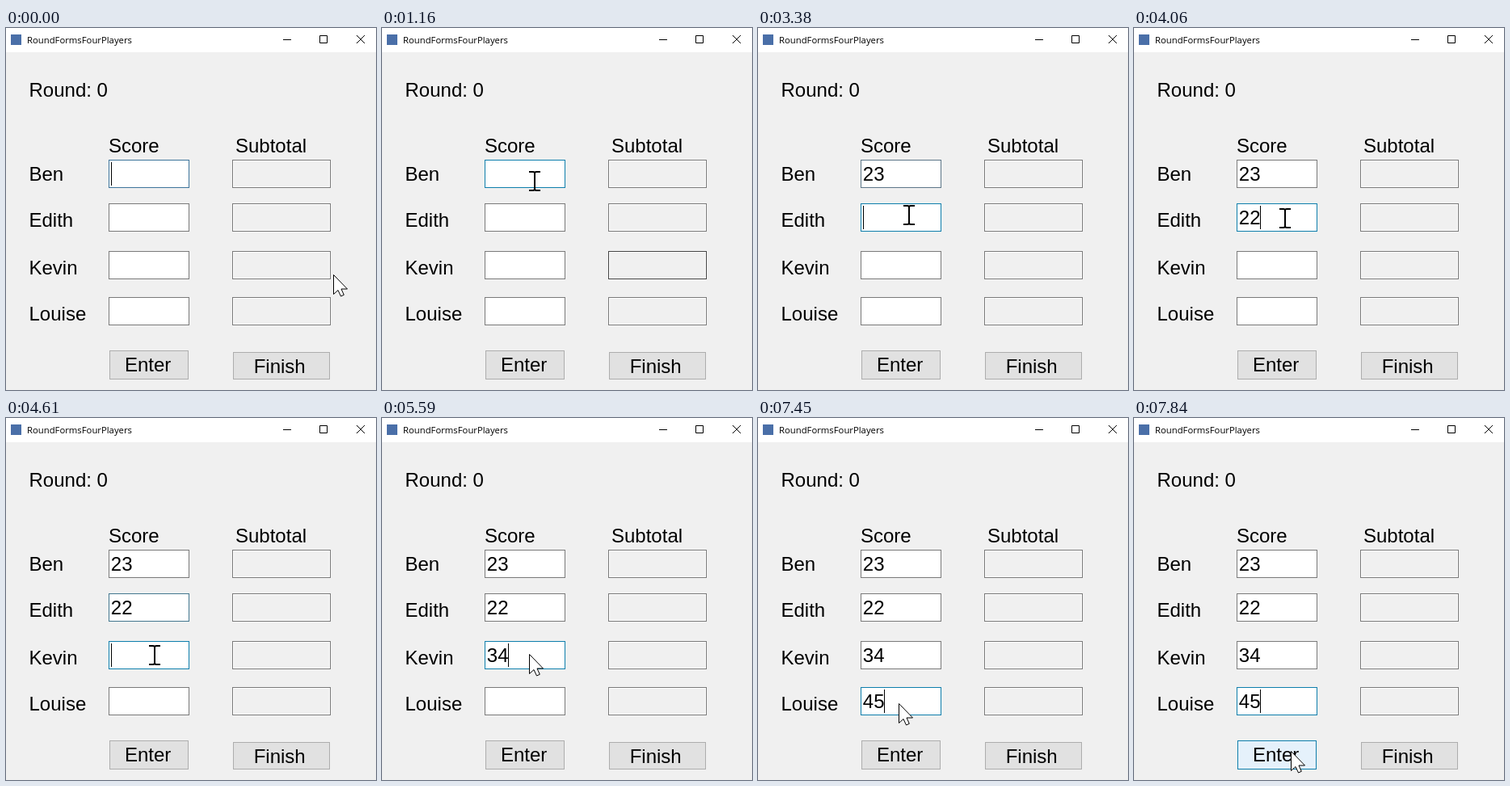
These frames come from a looping animation (458 by 448 pixels, 8 s). An HTML page:

```html
<!DOCTYPE html>
<html lang="en">
<head>
<meta charset="utf-8">
<title>Score entry form</title>
<style>
  html, body { margin: 0; width: 100%; height: 100%; overflow: hidden; background: #f0f0f0; }
  svg { display: block; }
  text { font-family: "Liberation Sans", Arial, sans-serif; font-size: 24px; fill: #000; white-space: pre; }
  .title { font-family: "Open Sans", "Noto Sans", sans-serif; font-size: 11.3px; }
  .line { fill: none; stroke: #000; }
</style>
</head>
<body>
<svg id="stage" width="458" height="448" viewBox="0 0 458 448">
  <rect width="458" height="448" fill="#f0f0f0"/>
  <rect width="458" height="30" fill="#fff"/>
  <rect x="6" y="8" width="13" height="13" fill="#4a6fa8"/>
  <text class="title" x="26" y="19">RoundFormsFourPlayers</text>
  <path class="line" d="M343 14.5h10M388.5 9.5h9v9h-9z"/>
  <path class="line" d="M434 9l10 10M444 9l-10 10"/>
</svg>
<script>
const LOOP = 8000;
const GREY = '#7a7a7a', BLUE = '#0d7eac', DARK = '#444', FADING = '#43778f';
const rows = [163, 217, 276, 333];
const names = ['Ben', 'Edith', 'Kevin', 'Louise'];
const labelY = [189, 246, 305, 362];
const stage = document.getElementById('stage');

function add(tag, attrs, content = '') {
  const el = document.createElementNS('http://www.w3.org/2000/svg', tag);
  for (const key in attrs) el.setAttribute(key, attrs[key]);
  el.textContent = content;
  stage.append(el);
  return el;
}
const label = (x, y, s) => add('text', { x, y }, s);
const box = (x, y, w, h, fill, stroke) =>
  add('rect', { x: x + .5, y: y + .5, width: w - 1, height: h - 1, fill, stroke });

label(28.5, 85, 'Round: 0');
label(127, 154, 'Score');
label(284, 154, 'Subtotal');
names.forEach((name, i) => label(28.5, labelY[i], name));
const scores = rows.map(y => box(127, y, 100, 35, '#fff', GREY));
const totals = rows.map(y => {
  box(281, y + 1, 120, 33, '#f0f0f0', '#fff');
  return box(280, y, 122, 35, 'none', GREY);
});
const entries = rows.map(y => label(129.8, y + 26, ''));
const enter = box(128, 399, 98, 36, '#e1e1e1', '#adadad');
box(281, 401, 120, 34, '#e1e1e1', '#adadad');
label(147, 425, 'Enter');
label(306.7, 427, 'Finish');
const caret = add('rect', { width: 1, height: 29 });
const arrow = add('path', {
  d: 'M.5 .5V24.5L6 19.5L9.5 27L13.3 25.3L10 18H17.5Z', fill: '#fff', stroke: '#000'
});
const beam = add('path', {
  d: 'M-7 -12H-2Q0 -12 0 -10Q0 -12 2 -12H7M0 -11V10M-7 11H-2Q0 11 0 9Q0 11 2 11H7',
  fill: 'none', stroke: '#000', 'stroke-width': 2
});

// Each track lists [time, value...]; a value holds until the next entry.
const pointer = [
  [0, 'arrow', 405, 305], [700, 'beam', 396, 300], [800, 'beam', 360, 282],
  [890, 'arrow', 298, 246], [980, 'arrow', 236, 208], [1070, 'beam', 200, 194],
  [1160, 'beam', 189, 190], [2230, 'arrow', 186, 186], [2610, 'beam', 189, 192],
  [2700, 'arrow', 186, 204], [2800, 'beam', 187, 224], [2890, 'beam', 187, 232],
  [3560, 'arrow', 184, 230], [4040, 'beam', 187, 236], [4140, 'arrow', 184, 260],
  [4240, 'beam', 184, 286], [4330, 'beam', 184, 294], [5100, 'arrow', 182, 292],
  [5610, 'beam', 183, 298], [5700, 'arrow', 179, 315], [5800, 'beam', 177, 340],
  [5900, 'beam', 175, 355], [6270, 'beam', 178, 355], [6480, 'beam', 177, 355],
  [6950, 'arrow', 174, 353], [7550, 'beam', 178, 361], [7650, 'arrow', 182, 378],
  [7740, 'arrow', 190, 402], [7840, 'arrow', 194, 412]
];
const typed = [
  [[0, ''], [2230, '2'], [2520, '23']],
  [[0, ''], [3560, '2'], [3760, '22']],
  [[0, ''], [5100, '3'], [5410, '34']],
  [[0, ''], [6950, '4'], [7450, '45']]
];
const borders = [
  [[0, '#3d749b'], [100, BLUE], [3290, '#5d7688'], [3560, GREY]],
  [[0, GREY], [2800, DARK], [3190, BLUE], [4610, FADING], [4720, GREY]],
  [[0, GREY], [4240, DARK], [4610, BLUE], [6090, FADING], [6190, GREY]],
  [[0, GREY], [5800, DARK], [6090, BLUE]]
];
const totalBorder = [[0, GREY], [700, DARK], [1450, '#666'], [1640, GREY]];
const focus = [[0, 0], [3190, 1], [4610, 2], [6090, 3]];
const blink = [
  [0, 1], [700, 0], [1270, 1], [1640, 0], [2230, 1], [4330, 0],
  [4610, 1], [6000, 0], [6090, 1], [6650, 0], [6950, 1]
];
const at = (track, t) => track.findLast(step => step[0] <= t);

function draw(now) {
  const t = now % LOOP;
  const text = typed.map(track => at(track, t)[1]);
  entries.forEach((el, i) => { el.textContent = text[i]; });
  scores.forEach((el, i) => el.setAttribute('stroke', at(borders[i], t)[1]));
  totals[2].setAttribute('stroke', at(totalBorder, t)[1]);

  const row = at(focus, t)[1];
  caret.setAttribute('x', 130 + 13 * text[row].length);
  caret.setAttribute('y', rows[row] + 3);
  caret.setAttribute('opacity', at(blink, t)[1]);

  const hover = t >= 7740;
  enter.setAttribute('fill', hover ? '#e5f1fb' : '#e1e1e1');
  enter.setAttribute('stroke', hover ? BLUE : '#adadad');

  const [, kind, x, y] = at(pointer, t);
  for (const [el, id] of [[arrow, 'arrow'], [beam, 'beam']]) {
    el.setAttribute('transform', `translate(${x} ${y})`);
    el.setAttribute('visibility', id === kind ? 'visible' : 'hidden');
  }
}

function tick() {
  draw(performance.now());
  requestAnimationFrame(tick);
}
tick();
</script>
</body>
</html>
```
